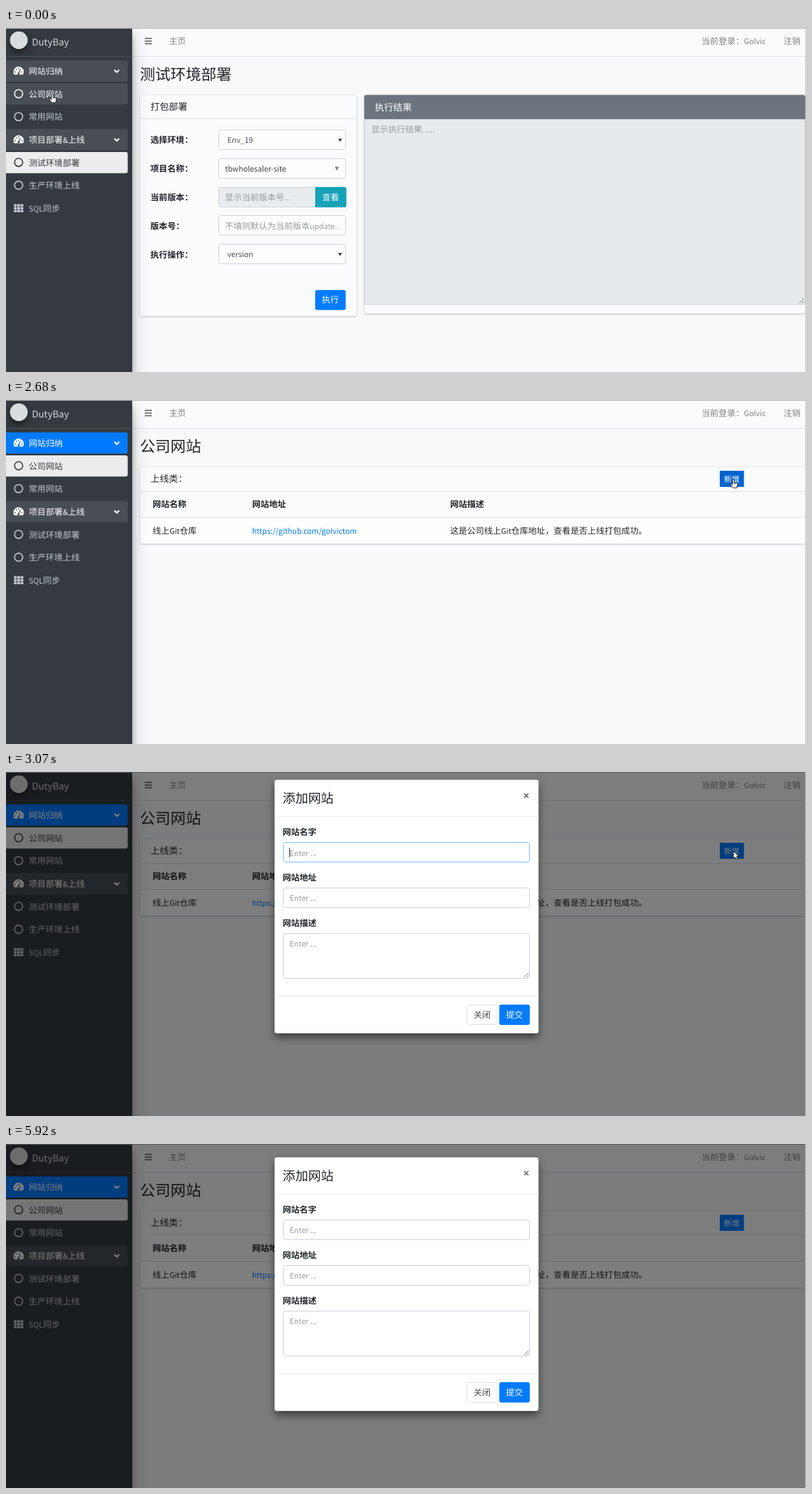
These frames come from a looping animation (1141 px wide and 491 px high, 7.05 s). An HTML page with a canvas:

```html
<!DOCTYPE html>
<html lang="zh-CN">
<head>
<meta charset="utf-8">
<title>部署后台</title>
<style>
html, body { margin: 0; width: 100%; height: 100%; overflow: hidden; background: #f8f9fb; }
canvas { display: block; }
</style>
</head>
<body>
<canvas id="stage" width="1141" height="491"></canvas>
<script>
const W = 1141, H = 491, LOOP = 7050;
const ctx = document.getElementById('stage').getContext('2d');
const FONT = '"Noto Sans CJK SC", "Noto Sans CJK", sans-serif';
const LATIN = 0.895; // Latin glyphs run large in this family
const BASE = 12.1;
const BLUE = '#007bff', DARK = '#343a40', INK = '#212529', PALE = '#c2c7d0';
const BORDER = '#ced4da', HINT = '#949a9f', FIELD = '#495057', MUTED = '#808182';

const clamp = (v, a = 0, b = 1) => Math.min(b, Math.max(a, v));

function rect(x, y, w, h, color) {
  ctx.fillStyle = color;
  ctx.fillRect(x, y, w, h);
}

function box(x, y, w, h, r, fill, stroke) {
  ctx.beginPath();
  ctx.roundRect(x, y, w, h, r);
  if (fill) { ctx.fillStyle = fill; ctx.fill(); }
  if (stroke) { ctx.strokeStyle = stroke; ctx.lineWidth = 1; ctx.stroke(); }
}

function disc(x, y, r, color) {
  ctx.beginPath();
  ctx.arc(x, y, r, 0, Math.PI * 2);
  ctx.fillStyle = color;
  ctx.fill();
}

function line(points, color, width) {
  ctx.beginPath();
  points.forEach(([x, y]) => ctx.lineTo(x, y));
  ctx.strokeStyle = color;
  ctx.lineWidth = width;
  ctx.stroke();
}

function poly(points, fill) {
  ctx.beginPath();
  points.forEach(([x, y]) => ctx.lineTo(x, y));
  ctx.closePath();
  ctx.fillStyle = fill;
  ctx.fill();
}

function withShadow(dy, blur, alpha, draw) {
  ctx.save();
  ctx.shadowColor = `rgba(0,0,0,${alpha})`;
  ctx.shadowOffsetY = dy;
  ctx.shadowBlur = blur;
  draw();
  ctx.restore();
}

// Text centred vertically on cy
function text(str, x, cy, color, size = BASE, weight = 400) {
  ctx.fillStyle = color;
  const y = cy + size * 0.37;
  for (const run of str.match(/[ -~]+|[^ -~]+/g)) {
    const px = run.charCodeAt(0) < 127 ? size * LATIN : size;
    ctx.font = `${weight} ${px}px ${FONT}`;
    ctx.fillText(run, x, y);
    x += ctx.measureText(run).width;
  }
}

const bold = (str, x, cy) => text(str, x, cy, INK, BASE, 700);

function gauge(y, back) {
  ctx.beginPath();
  ctx.arc(18, y + 1, 7.4, Math.PI * 0.82, Math.PI * 0.18);
  ctx.closePath();
  ctx.fillStyle = '#fff';
  ctx.fill();
  for (const [dx, dy] of [[-4.8, 1.2], [-3.2, -2.6], [0, -4.2], [4.8, 1.2]]) disc(18 + dx, y + dy, 0.9, back);
  line([[18, y + 3], [20.6, y - 2.8]], back, 1.2);
  disc(18, y + 3.4, 1.6, back);
}

function ring(y, color) {
  ctx.beginPath();
  ctx.arc(18, y, 5.8, 0, Math.PI * 2);
  ctx.strokeStyle = color;
  ctx.lineWidth = 1.6;
  ctx.stroke();
}

function grid(y) {
  for (let i = 0; i < 9; i++) {
    rect(11.3 + (i % 3) * 4.7, y - 6 + Math.floor(i / 3) * 4.1, 4, 3.4, PALE);
  }
}

const MENU = [
  ['网站归纳', 'group'], ['公司网站', 'leaf'], ['常用网站', 'leaf'], ['项目部署&上线', 'group'],
  ['测试环境部署', 'leaf'], ['生产环境上线', 'leaf'], ['SQL同步', 'grid']
];

function sidebar(site) {
  const body = () => rect(-40, 0, 220, H + 40, DARK);
  withShadow(10.6, 21, 0.25, body);
  withShadow(7.6, 7.6, 0.22, body);
  const logo = () => disc(18.3, 17.5, 12.5, '#dadbdc');
  ctx.save();
  ctx.beginPath();
  ctx.rect(0, 0, 180, H);
  ctx.clip();
  withShadow(7.6, 15, 0.25, logo);
  withShadow(4.6, 4.6, 0.23, logo);
  ctx.restore();
  text('DutyBay', 37, 19, '#d3d5d7', 15, 300);
  rect(0, 40, 180, 1, '#4b545c');

  MENU.forEach(([label, kind], i) => {
    const y = 61.5 + i * 32.65;
    const active = i === (site ? 1 : 4);
    const hover = !site && i === 1;
    let back = null, color = PALE;
    if (kind === 'group') { back = site && i === 0 ? BLUE : '#484e53'; color = '#fff'; }
    if (hover) { back = '#484e53'; color = '#fff'; }
    if (active) { back = '#ebecec'; color = DARK; }
    if (back) box(-4, y - 15.2, 177.6, 30.3, 3, back);
    if (kind === 'group') {
      gauge(y, back);
      line([[154.6, y - 1.7], [158, y + 1.6], [161.4, y - 1.7]], '#fff', 2);
    } else if (kind === 'leaf') ring(y - 0.3, color);
    else grid(y);
    text(label, 32.5, y, color);
  });
}

function navbar() {
  rect(180, 0, W, 40, '#fafbfc');
  rect(180, 40, W, 1, '#dee2e6');
  for (let i = 0; i < 3; i++) rect(198, 14 + i * 3.8, 10, 1.7, '#68696a');
  text('主页', 232.5, 19, MUTED);
  text('当前登录：Golvic', 992, 19, MUTED);
  text('注销', 1109, 19, MUTED);
}

function card(x, y, w, h, fill) {
  const body = () => box(x, y, w, h, 3, fill);
  withShadow(0, 1, 0.2, body);
  withShadow(1, 3, 0.22, body);
}

const field = (y, w = 181, fill = '#fdfdfe') => box(303.5, y + 0.5, w, 28, 3, fill, BORDER);
const arrow = (x, y, r, color) => poly([[x - r, y - r * 0.8], [x + r, y - r * 0.8], [x, y + r]], color);

function handle(x, y) {
  line([[x - 7, y], [x, y - 7]], '#8a8a8a', 1);
  line([[x - 3, y], [x, y - 3]], '#8a8a8a', 1);
}

function deployPage() {
  text('测试环境部署', 191, 66, INK, 21.8);
  card(191, 95.5, 309, 315.5, '#fafbfd');
  rect(191, 129, 309, 1, '#dfe1e3');
  text('打包部署', 206, 112.5, INK, 13.2);
  ['选择环境：', '项目名称：', '当前版本：', '版本号：', '执行操作：']
    .forEach((label, i) => bold(label, 206, 160 + i * 40.8));

  field(145);
  text('Env_19', 315.7, 160, FIELD);
  arrow(476.5, 160, 2.6, '#333');
  field(186);
  text('tbwholesaler-site', 312.3, 201, '#444');
  arrow(472, 200.5, 3.2, '#888');
  field(227, 140, '#e9ecef');
  text('显示当前版本号...', 312.3, 241.5, HINT);
  box(441, 227, 44.5, 29, [0, 3, 3, 0], '#17a2b8');
  text('查看', 451, 241.5, '#fff');
  field(267);
  text('不填则默认为当前版本update..', 312.3, 282.5, HINT);
  field(308);
  text('version', 315.7, 323, FIELD);
  arrow(476.5, 323, 2.6, '#333');
  box(441, 374, 43.5, 28.5, 3, BLUE);
  text('执行', 450.5, 388, '#fff');

  card(511, 95.5, 629, 312, '#fafbfd');
  box(511, 95.5, 629, 35, [3, 3, 0, 0], '#6c757d');
  text('执行结果', 526, 113, '#fff', 13.2);
  rect(511, 130, 629, 265, BORDER);
  rect(512, 131, 627, 263, '#e7eaed');
  text('显示执行结果......', 521, 145, HINT);
  handle(1138, 393);
}

function sitePage(rowHover, buttonHover) {
  text('公司网站', 191, 66, INK, 21.8);
  card(191, 95.5, 949, 109.5, '#fbfbfc');
  rect(191, 130, 949, 1, '#dfe1e3');
  text('上线类：', 206, 112.5, INK, 13.2);
  rect(1018, 101, 34.5, 23, buttonHover ? '#0064cf' : BLUE);
  text('新增', 1024, 112.5, '#fff', 11.1);
  bold('网站名称', 209, 149);
  bold('网站地址', 351, 149);
  bold('网站描述', 633.5, 149);
  box(191, 167, 949, 38, [0, 0, 3, 3], rowHover ? '#ebebeb' : '#fefefe');
  rect(191, 167, 949, 1, '#dee2e6');
  text('线上Git仓库', 209, 186.5, INK);
  text('https://github.com/golvictom', 351, 186.5, BLUE);
  text('这是公司线上Git仓库地址，查看是否上线打包成功。', 633.5, 186.5, INK);
}

function modal(dy, alpha, focus) {
  ctx.save();
  ctx.globalAlpha = alpha;
  ctx.translate(0, dy);
  withShadow(6, 12, 0.5, () => box(383, 19, 376.5, 362, 3.5, '#fff'));
  text('添加网站', 394.5, 45.5, INK, 18.2);
  line([[739, 38.7], [745, 44.7]], '#777', 1.8);
  line([[745, 38.7], [739, 44.7]], '#777', 1.8);
  rect(383, 71, 376.5, 1, '#e9ecef');
  bold('网站名字', 394.5, 93.5);
  bold('网站地址', 394.5, 158.3);
  bold('网站描述', 394.5, 223.3);
  box(395.5, 108.5, 351, 28, 3, '#fff', focus ? '#80bdff' : BORDER);
  box(395.5, 173.5, 351, 28, 3, '#fff', BORDER);
  box(395.5, 238.5, 351, 64, 3, '#fff', BORDER);
  for (const y of [123, 187.8, 252.5]) text('Enter ...', 404.5, y, HINT);
  if (focus) rect(404, 116, 1, 14, '#333');
  handle(745.5, 301.5);
  rect(383, 327, 376.5, 1, '#e9ecef');
  box(657.5, 340.5, 43, 28, 3, '#fff', '#dddfe1');
  text('关闭', 667, 354.5, '#444');
  box(703.5, 340, 43.5, 29, 3, BLUE);
  text('提交', 713, 354.5, '#fff');
  ctx.restore();
}

const PATH = [
  [0, 66, 94], [410, 66, 94], [410, 66, 88], [560, 66, 88], [560, 66, 94], [1370, 66, 94],
  [1530, 380, 135], [1670, 745, 173], [1830, 930, 184], [1990, 1012, 163], [2070, 1026, 146],
  [2110, 1029, 142], [2300, 1035, 126], [2530, 1037.5, 113], [3390, 1037.5, 113],
  [3650, 860, 330], [3920, 764, 466], [4040, 764, 466], [4420, 706, 399], [5080, 706, 399],
  [5220, 1130, 472], [5600, 1132, 477], [5920, 1134, 491]
];

function cursorAt(t) {
  if (t >= 5920 || (t >= 5220 && t < 5620)) return null;
  const i = PATH.findIndex((p, k) => k > 0 && t < p[0]);
  const [t0, x0, y0] = PATH[i - 1], [t1, x1, y1] = PATH[i];
  const k = (t - t0) / (t1 - t0);
  return { x: x0 + (x1 - x0) * k, y: y0 + (y1 - y0) * k };
}

function pointer(x, y, hand) {
  ctx.save();
  ctx.translate(x, y);
  ctx.lineJoin = 'round';
  const shape = hand
    ? 'M-1.2 .9Q0-.7 1.2 .9V4.6L5 5.6Q6 6 5.8 7.6L4.8 12.4H-.8L-4 8Q-4.4 6.4-3 6.6L-1.2 8Z'
    : 'M0 0V10.6L2.5 8.4L4.2 12.2L5.9 11.4L4.3 7.7H7.6Z';
  const p = new Path2D(shape);
  ctx.fillStyle = '#fff';
  ctx.strokeStyle = '#222';
  ctx.lineWidth = 0.9;
  ctx.fill(p);
  ctx.stroke(p);
  if (hand) {
    line([[1.2, 4.6], [1.2, 7]], '#222', 0.7);
    line([[3, 5.2], [3, 7.2]], '#222', 0.7);
  }
  ctx.restore();
}

// Inverse-free ease-out: cubic-bezier(0, 0, .58, 1)
function easeOut(p) {
  let lo = 0, hi = 1;
  for (let i = 0; i < 20; i++) {
    const u = (lo + hi) / 2;
    if (3 * 0.58 * (1 - u) * u * u + u * u * u < p) lo = u; else hi = u;
  }
  return 3 * lo * lo - 2 * lo * lo * lo;
}

function draw(t) {
  const site = t >= 930;
  const cur = cursorAt(t);
  const clicked = t >= 2730;
  const overButton = site && !clicked && cur.x > 1018 && cur.y < 124;
  const overRow = site && !clicked && cur.x > 191 && cur.y > 167;

  ctx.textRendering = 'geometricPrecision';
  rect(0, 0, W, H, '#f8f9fb');
  navbar();
  if (site) sitePage(overRow, overButton);
  else deployPage();
  sidebar(site);
  rect(0, 0, W, 1, '#b4b6b8');

  if (clicked) {
    const shade = t < 2790 ? 0.12 : t < 2890 ? 0.285 : 0.5;
    rect(0, 0, W, H, `rgba(0,0,0,${shade})`);
  }
  rect(1140, 0, 1, H, '#c9cbcd');
  if (t >= 2890) {
    const age = t - 2870;
    modal(-38 * (1 - easeOut(clamp(age / 330))), clamp(age / 150), t >= 3030 && t < 3260);
  }
  if (cur) pointer(cur.x, cur.y, overButton || t < 1410);
}

function frame(now) {
  const t = now % LOOP;
  const moving = (t > 1390 && t < 2680) || t > 2890;
  draw(moving ? Math.floor((t + 10) / 40) * 40 - 10 : t);
  requestAnimationFrame(frame);
}
draw(0);
requestAnimationFrame(frame);
</script>
</body>
</html>
```
